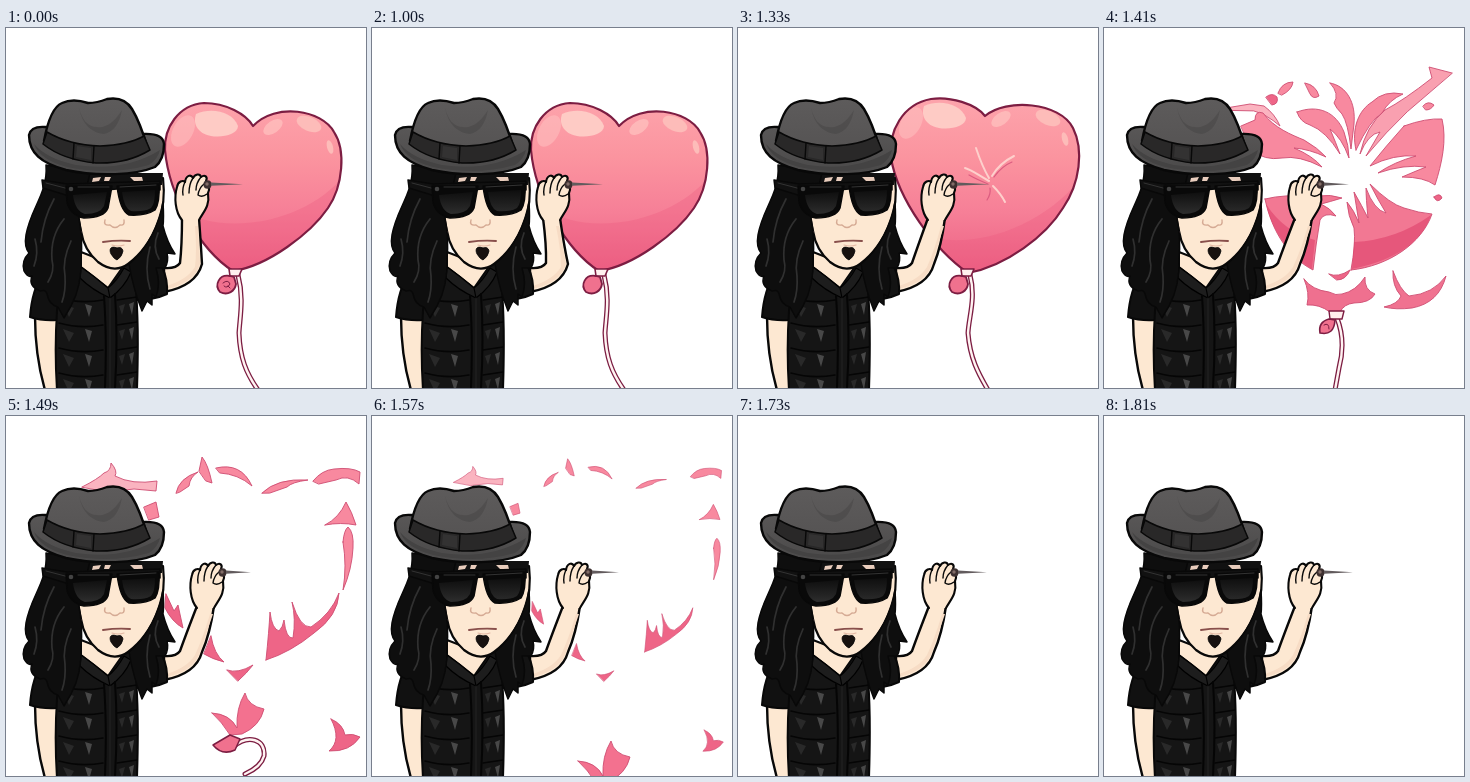
An HTML page with a canvas for the animation above (2980 ms loop, 360 px wide and 360 px high).

```html
<!DOCTYPE html>
<html lang="en">
<head>
<meta charset="utf-8">
<title>Heart balloon pop</title>
<style>
html, body { margin: 0; width: 100%; height: 100%; overflow: hidden; background: #fff; }
canvas { display: block; width: 100vmin; height: 100vmin; }
</style>
</head>
<body>
<canvas id="stage" width="360" height="360"></canvas>
<script>
const ctx = document.getElementById('stage').getContext('2d');
const LOOP = 2980;
const INK = '#080808', SKIN = '#fde8d2', WINE = '#7c1d42', PINK = '#f8899f', ROSE = '#ee6587';
ctx.lineJoin = ctx.lineCap = 'round';

function shape(d, fill, stroke, width = 2) {
  const p = new Path2D(d);
  if (fill) { ctx.fillStyle = fill; ctx.fill(p); }
  if (stroke) { ctx.strokeStyle = stroke; ctx.lineWidth = width; ctx.stroke(p); }
}

function oval(x, y, rx, ry, turn, fill) {
  ctx.beginPath();
  ctx.ellipse(x, y, rx, ry, turn, 0, 7);
  ctx.fillStyle = fill;
  ctx.fill();
}

function fade(y0, y1, ...colors) {
  const g = ctx.createLinearGradient(0, y0, 0, y1);
  colors.forEach((c, i) => g.addColorStop(i / (colors.length - 1), c));
  return g;
}

// ---- balloon ----
const calm = [247,98, 240,86,220,75,198,75, 172,77,158,100,159,122, 163,168,194,222,227,243,
  262,238,305,205,322,180, 337,158,340,122,328,104, 316,82,270,74,247,98];
const pressed = [247,88, 238,76,212,68,193,71, 165,76,150,103,153,130, 160,172,197,222,230,245,
  268,238,308,208,325,180, 342,155,346,122,335,100, 322,74,268,70,247,88];

function heart(k) {
  const v = calm.map((a, i) => a + (pressed[i] - a) * k);
  return `M${v.slice(0, 2)} C${v.slice(2)} Z`;
}

function string(d) {
  shape(d, null, WINE, 5);
  shape(d, null, '#fff3f2', 2.4);
}

function balloon(k, curl) {
  const d = heart(k);
  string(`M232,247 C238,270 ${234 - 3 * k},288 ${233 - 3 * k},305 C${234 - 2 * k},330 240,345 ${252 - 2 * k},362`);
  shape(d, fade(74, 240, '#fda3ab', '#fb949f', '#f67f97', '#ed6385'));
  ctx.save();
  ctx.clip(new Path2D(d));
  shape(k > 0.6
    ? 'M180,205 C225,224 300,205 345,148 L340,250 L200,250Z'
    : 'M174,180 C205,206 292,202 338,148 L340,250 L180,250Z', 'rgba(233,82,123,.28)');
  ctx.translate(-4 * k, -8 * k);
  oval(177, 103, 10, 17, 0.5, 'rgba(255,190,190,.6)');
  shape('M190,86 C206,79 227,84 232,98 C232,106 217,110 205,108 C194,106 186,98 190,86Z', '#fecbc5');
  oval(267, 99, 11, 6, -0.6, 'rgba(255,195,192,.7)');
  oval(303 + 11 * k, 96 + 2 * k, 13, 7, 0.4, '#fdbcb9');
  oval(324 + 7 * k, 119, 3, 7, -0.25, '#fdbcb9');
  ctx.restore();
  shape(d, null, WINE, 2.2);
  shape('M223,241 L236,241 L233,248 L224,248Z', '#fff0ee', WINE, 1.6);
  shape('M224,248 C213,246 208,257 214,264 C222,268 229,263 230,256 L228,249Z', '#f0718e', WINE, 1.8);
  if (curl) shape('M217,255 Q222,251 224,256 Q221,261 218,258 M222,258 L224,260', null, WINE, 1);
  if (k) creases(k);
}

function creases(k) {
  ctx.save();
  ctx.globalAlpha = k;
  shape('M251,153 C240,147 234,142 227,140 M251,150 C245,140 241,129 238,120 M254,148 C260,138 266,133 276,128' +
    ' M255,158 C261,164 264,168 267,174', null, '#fed0cc', 2);
  shape('M250,156 Q238,151 231,147 M256,149 Q264,138 274,134 M252,160 Q253,166 249,172', null, '#dc5c80', 1.2);
  ctx.restore();
}

// ---- popped balloon ----
const burst = [
  ['M110,82 L146,76 L160,78 Q171,86 176,98 Q162,86 150,83Z', '#fbb4c0'],
  ['M137,98 L151,92 Q151,82 159,85 C170,100 188,107 200,112 Q214,120 222,129 Q205,121 190,120 Q209,128 218,139 Q195,127 178,130 Q160,133 148,122Z', PINK],
  ['M193,84 C214,76 232,84 240,104 Q245,118 245,130 Q238,110 226,101 Q232,115 236,126 Q222,103 206,97 Q196,94 193,84Z', PINK],
  ['M226,55 C243,58 252,75 250,96 L247,121 Q244,95 238,86 Q232,80 230,75 Q236,66 226,55Z', PINK],
  ['M162,69 Q168,64 173,69 Q175,76 168,77Z', ROSE],
  ['M174,65 Q178,54 189,54 Q188,62 178,67Z', PINK],
  ['M201,55 Q212,57 215,68 Q209,72 206,66Z', PINK],
  ['M252,122 C247,100 255,82 268,74 Q280,62 299,66 Q285,72 278,85 Q266,92 252,122Z', PINK],
  ['M348,45 L325,39 L328,50 Q300,72 281,82 Q262,98 256,126 Q264,106 276,104 L262,128 Q282,104 303,84Z', '#f9a0b0'],
  ['M319,78 Q324,72 330,77 Q327,82 322,82Z', PINK],
  ['M300,98 Q322,90 338,91 C343,112 338,135 331,157 Q320,149 298,149 Q312,143 322,139 Q300,136 274,145 Q290,134 312,128 Q290,126 266,138 Q282,118 300,98Z', PINK],
  ['M161,171 Q180,166 215,168 Q226,166 238,170 Q225,174 217,176 Q226,180 232,188 Q220,184 216,192 Q212,215 209,242 C186,230 168,205 161,171Z', '#f27893'],
  ['M247,242 Q252,215 250,200 Q244,188 243,174 Q250,182 255,195 Q252,176 250,164 Q258,178 264,190 Q262,170 262,160 Q270,182 282,185 Q274,172 266,156 Q286,176 300,180 Q315,185 328,186 C318,215 285,238 247,242Z', '#f27893'],
  ['M330,169 Q336,164 338,170 Q333,176 330,169Z', ROSE],
  ['M225,246 Q234,250 246,242 Q242,252 233,252Z', ROSE],
  ['M289,243 Q296,262 305,268 Q329,266 342,248 Q335,275 308,280 Q292,282 280,279 Q294,276 297,268 Q288,258 289,243Z', '#f07290']
];

const rim = [
  [105, 65, 'M76,71 Q92,63 98,57 Q105,55 105,47 Q112,55 109,60 Q126,69 151,65 L150,75 L128,73 L102,76Z', '#fab4c0'],
  [147, 95, 'M138,91 L150,86 L153,101 L143,104Z', PINK],
  [181, 65, 'M170,77 Q173,62 192,56 Q184,61 183,70 L174,76Z', PINK],
  [199, 55, 'M193,55 L196,41 Q202,48 206,67 L200,65Z', PINK],
  [230, 58, 'M210,52 Q235,46 246,70 Q232,58 214,57Z', PINK],
  [277, 70, 'M256,77 Q271,62 302,64 Q286,66 281,71 L264,77Z', PINK],
  [333, 60, 'M307,65 Q316,54 328,53 Q345,51 354,56 L353,68 Q342,58 330,64 L313,68Z', PINK],
  [336, 98, 'M319,109 Q333,102 340,86 Q346,96 350,109 Q335,106 319,109Z', PINK],
  [342, 145, 'M337,126 Q338,114 342,111 Q348,116 347,132 Q346,153 337,174 Q341,150 337,126Z', PINK],
  [293, 215, 'M260,244 Q263,215 264,196 Q266,213 273,215 Q277,211 278,204 Q280,223 287,222 Q290,203 286,186 Q294,212 305,211 Q325,198 333,177 Q332,200 308,217 Q285,236 260,244Z', ROSE],
  [168, 197, 'M160,178 L168,195 L172,189 L177,212 Q166,206 159,192Z', ROSE],
  [207, 236, 'M205,220 Q208,238 218,246 Q206,243 198,238Z', ROSE],
  [233, 257, 'M221,254 Q232,258 247,249 Q241,257 232,265Z', ROSE],
  [338, 321, 'M325,303 Q337,308 339,319 Q347,317 354,321 Q344,336 323,335 Q336,324 325,303Z', ROSE]
];

const crumbs = [
  'M174,69 L178,61 L185,60 L181,67Z', 'M218,62 L229,63 L238,71 L238,77 L229,72 L225,73Z',
  'M260,81 L267,76 L271,80 L264,84Z', 'M276,81 L282,72 L295,73 L300,78 L287,78Z',
  'M317,81 L323,76 L326,83 L321,85Z', 'M345,97 L349,101 L349,113 L343,106Z',
  'M346,120 L354,117 L357,132 L350,138Z', 'M352,142 L357,151 L351,165 L348,153Z',
  'M304,222 L308,213 L320,207 L317,218Z', 'M264,249 L268,240 L281,237 L274,245Z',
  'M228,269 L234,266 L241,267 L235,270Z', 'M158,194 L167,191 L167,200 L174,211 L163,209Z'
];

function shard(d, fill) { shape(d, fill, '#cf4d72', 0.9); }

function explode() {
  burst.forEach(([d, fill]) => shard(d, fill));
  shape('M162,176 C168,202 186,228 208,241 L211,212 Q180,204 162,176Z M250,214 Q292,212 327,187 Q313,228 248,241Z', 'rgba(224,66,108,.6)');
  string('M233,290 C240,308 239,325 235,340 L231,362');
  shard('M200,251 Q208,262 225,264 Q232,268 238,266 Q252,263 261,249 Q260,262 271,266 Q266,275 250,275 Q240,276 236,284 L226,284 Q215,276 203,277 Q206,265 200,251Z', '#ef708f');
  shape('M225,283 L240,283 L238,291 L226,291Z', '#fff0ee', WINE, 1.4);
  shape('M225,291 Q214,294 216,305 Q230,308 231,292Z', '#f0718e', WINE, 1.6);
  shape('M220,297 Q225,294 225,301', null, WINE, 1);
}

function scatter(spread, size) {
  for (const [x, y, d, fill] of rim) {
    ctx.save();
    ctx.translate(245 + (x - 245) * spread, 155 + (y - 155) * spread);
    ctx.scale(size, size);
    ctx.translate(-x, -y);
    shard(d, fill);
    ctx.restore();
  }
}

function torn(drop) {
  ctx.save();
  ctx.translate(0, drop);
  string('M227,331 C242,318 260,323 258,340 Q255,351 239,358');
  shard('M206,297 Q224,298 231,312 Q230,292 239,277 Q242,290 258,293 Q254,310 236,318 L224,319 Q216,306 206,297Z', '#f3718f');
  shape('M224,319 L234,323 L229,334 Q216,340 207,329Z', '#f0718e', WINE, 1.5);
  ctx.restore();
}

// ---- figure ----
function arm(dx, tip) {
  shape(`M158,240 Q170,241 174,235 Q${176 + dx * 0.3},217 ${176 + dx},190 L${193 + dx},190 Q${195 + dx * 0.6},218 196,236 Q190,258 158,264Z`, SKIN, INK, 2.4);
  shape(`M${189 + dx},198 Q${191 + dx * 0.4},222 189,239 Q181,252 160,258 L160,261 Q188,255 194,236 L${192 + dx},198Z`, '#f7dcc5');
  ctx.save();
  ctx.translate(dx, 0);
  shape('M176,192 C169,184 168,169 171,159 C172,153 177,152 179,154 C180,147 185,146 187,150' +
    ' C189,146 194,145 195,149 C199,146 202,149 200,153 Q205,159 202,165 C204,178 198,183 193,192', SKIN, INK, 2.1);
  shape('M179,154 Q176,160 177,167 M187,150 Q183,156 183,165 M195,149 Q190,155 190,162 M198,156 Q193,160 192,167 Q196,170 201,166', null, INK, 1.4);
  oval(201.5, 156.5, 4, 4.2, 0, '#3d3030');
  oval(201, 156, 1.7, 1.7, 0, '#826c67');
  ctx.restore();
  shape(`M${205 + dx},154.6 L${tip},156.3 L${205 + dx},157.8Z`, '#625b5d');
}

function body() {
  shape('M29,288 C29,320 34,345 39,362 L55,362 L52,286Z', SKIN, INK, 2.4);
  shape('M37,246 Q26,261 24,289 Q36,293 51,292 L57,255Z', '#111', INK, 2);
  shape('M126,239 L156,239 Q162,251 161,266 Q148,272 130,272Z', '#131313', INK, 2);
  shape('M55,246 Q68,230 84,229 L126,236 Q134,268 131,362 L51,362 Q47,301 55,246Z', '#151515', INK, 2);
  shape('M75,224 L75,239 Q87,248 102,260 L116,240Z', SKIN, INK, 2);
  shape('M75,239 Q88,248 102,260 L104,270 Q86,262 74,250Z M118,240 Q111,253 102,260 L104,270 Q119,259 125,244Z', '#1d1d1d', '#000', 1.2);
  shape('M98,268 Q101,310 99,360 M109,266 Q112,310 109,360', null, '#050505', 2);
  shape('M104,270 L104,360', null, '#242424', 1);
  // quilted vest panels
  for (let i = 0; i < 4; i++) {
    const y = 270 + i * 25;
    shape(`M53,${y} Q74,${y + 6} 97,${y + 2} M111,${y + 2} L131,${y - 1}`, null, '#050505', 1.6);
    shape(`M57,${y + 6} L68,${y + 10} L63,${y + 19}Z M113,${y + 8} L119,${y + 6} L116,${y + 17}Z`, '#292929');
    shape(`M79,${y + 6} L86,${y + 8} L83,${y + 19}Z M123,${y + 6} L128,${y + 4} L126,${y + 17}Z`, '#484848');
  }
}

function hair() {
  shape('M40,137 C42,166 25,179 20,207 Q18,219 23,225 Q15,233 18,243 Q22,250 26,248 Q22,258 34,263' +
    ' Q40,261 41,266 Q43,277 52,279 L58,290 L65,278 Q76,258 75,231 Q77,212 73,190 L84,145Z', '#0e0e0e', INK, 1.5);
  shape('M157,174 Q158,190 157,198 Q161,214 169,226 L161,225 Q163,233 159,240 L150,240 Q155,256 150,269 L146,266' +
    ' L146,277 L141,273 L136,283 Q127,260 123,236 Q137,225 146,207 Q154,191 157,174Z', '#0e0e0e', INK, 1.5);
  shape('M48,171 Q37,191 35,214 M58,191 Q44,208 46,232 Q49,243 42,254 M65,213 Q56,232 59,248 Q60,263 56,274' +
    ' M29,211 Q33,225 28,238 M152,205 Q146,219 153,231 M144,219 Q138,241 144,261', null, '#303030', 1.7);
}

function face() {
  shape('M66,150 L157,150 Q160,176 152,195 Q141,222 122,236 Q108,246 92,234 Q78,222 75,203 L72,188Z', SKIN, INK, 2.2);
  shape('M70,192 L75,204', null, '#eba7b4', 1);
  shape('M62,145 L157,145 L156,157 L62,160Z', '#111');
  shape('M87,150 L95,149 L93,153 L86,154Z M99,149 L105,149 L103,153 L98,153Z M124,149 L136,149 L137,153 L128,153Z', '#e9cdbd');
  shape('M99,192 Q97,198 104,197 Q109,202 114,197 Q119,198 118,192', null, '#d5aa94', 1.4);
  shape('M97,214 Q111,212 124,213', null, '#884f4b', 1.9);
  shape('M106,217 Q112,219 118,217', null, '#e3b7a3', 1.2);
  shape('M111,220 C104,217 103,222 105,226 Q108,231 111,232 Q116,229 117,223 Q116,218 111,220Z', '#17110f', INK, 0.8);
}

function shades() {
  shape('M36,152 L61,156 L154,153 L154,162 Q110,157 63,168 L37,160Z', '#111', INK, 1.5);
  shape('M60,158 L106,158 L102,180 Q98,190 78,190 Q64,187 61,174Z', '#090909', INK, 1.5);
  shape('M111,158 L153,156 Q154,174 149,182 Q140,188 123,187 Q114,183 111,158Z', '#090909', INK, 1.5);
  shape('M67,167 L101,164 L98,178 Q94,186 79,186 Q69,183 67,167Z', fade(162, 188, '#0c0c0c', '#303030'));
  shape('M116,164 L149,162 Q149,176 145,180 Q138,184 125,183 Q118,180 116,164Z', fade(160, 186, '#0c0c0c', '#2c2c2c'));
  shape('M40,155 L59,160 M72,159 L103,159 M114,159 L150,157', null, '#333', 1);
  oval(65, 161, 2.3, 2.3, 0, '#444');
}

function hat() {
  shape('M39,99 Q25,98 23,107 C23,125 35,135 60,142 C92,149 130,147 149,139 Q158,132 158,116 Q157,105 137,106Z', fade(98, 147, '#595757', '#4a4949'), INK, 2.4);
  shape('M28,116 Q41,131 70,137 Q119,144 154,122 Q152,131 143,137 Q104,148 61,139 Q34,132 28,116Z', '#444343');
  shape('M38,113 Q44,80 56,75 Q67,70 82,75 Q91,75 101,71 Q118,68 126,81 Q134,94 142,121 Q97,143 38,113Z', fade(72, 130, '#5d5b5b', '#545252'), INK, 2.4);
  shape('M73,80 Q78,99 91,99 Q104,101 116,82 Q112,103 98,106 Q78,104 73,80Z', 'rgba(36,36,36,.18)');
  shape('M41,104 Q63,117 94,118 Q122,117 138,108 L144,122 Q121,136 90,135 Q57,132 37,116Z', '#292828', INK, 1.5);
  shape('M68,115 L67,131 M88,118 L87,135', null, INK, 1.4);
  shape('M71,118 L85,120 L85,132 L70,129Z', '#333232');
}

function figure(dx, tip) {
  arm(dx, tip);
  body();
  face();
  hair();
  shades();
  hat();
}

// ---- timeline: start, hand offset, needle tip, backdrop ----
const steps = [
  [0, 0, 237, () => balloon(0, true)],
  [1000, -5, 231, () => balloon(0)],
  [1250, 5, 242, () => balloon(0.45)],
  [1330, 14, 252, () => balloon(1)],
  [1410, 15, 245, explode],
  [1490, 15, 245, () => { scatter(1, 1); torn(0); }],
  [1570, 15, 247, () => { scatter(1.03, 0.66); torn(48); }],
  [1650, 15, 249, () => crumbs.forEach(d => shard(d, PINK))],
  [1730, 15, 249, () => {}]
];

const epoch = performance.now();

function draw() {
  const t = (performance.now() - epoch) % LOOP;
  const [, dx, tip, backdrop] = steps.findLast(s => s[0] <= t);
  ctx.fillStyle = '#fff';
  ctx.fillRect(0, 0, 360, 360);
  backdrop();
  figure(dx, tip);
  requestAnimationFrame(draw);
}
draw();
</script>
</body>
</html>
```
